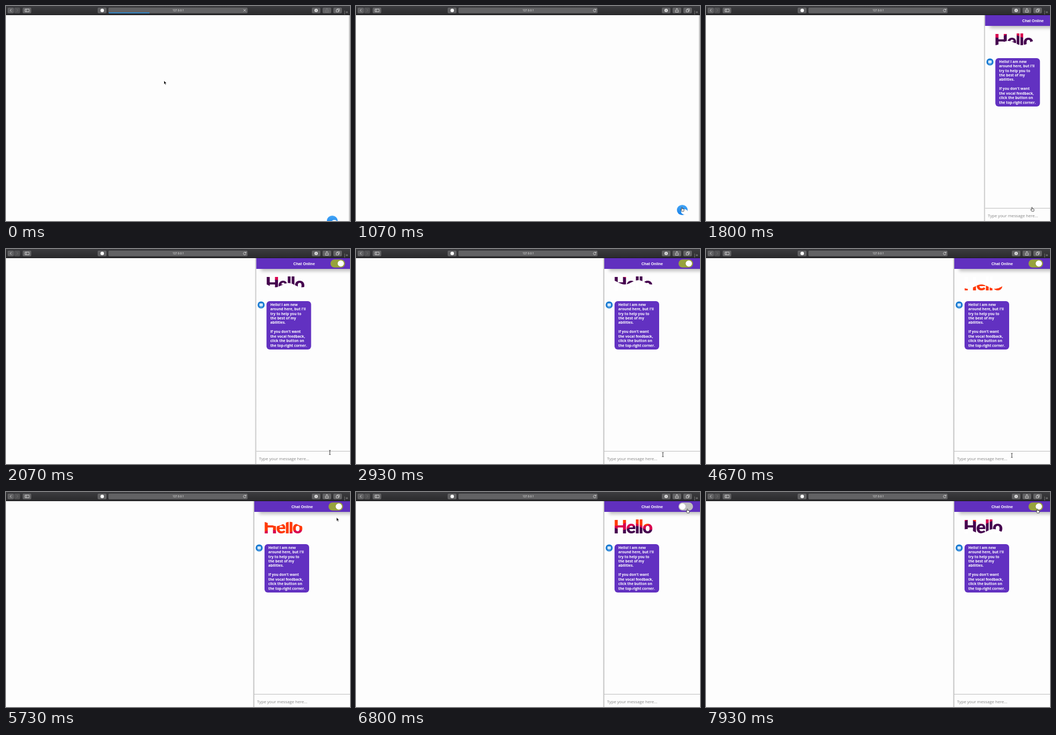
An HTML page for the animation above (8 s loop, 640 px wide and 400 px high).

```html
<!DOCTYPE html>
<html lang="en">
<head>
<meta charset="utf-8">
<title>Chat panel</title>
<style>
  html, body { margin: 0; width: 100%; height: 100%; overflow: hidden; background: #fdfdfd; }
  svg { display: block; width: 640px; height: 400px; }
  .url { font: 5.1px Roboto, sans-serif; fill: #eee; text-anchor: middle; }
  .title { font: bold 7.15px "Liberation Sans", sans-serif; fill: #fff; text-anchor: middle; }
  .msg { font: bold 6.7px "Open Sans", sans-serif; fill: #fff; }
  .hint { font: 7.7px "Open Sans", sans-serif; fill: #858585; }
  .hello { font: 900 33px Lato, sans-serif; letter-spacing: -1.5px; }
  .key { fill: #626264; }
  .line { fill: none; stroke: #e4e4e4; stroke-width: .8; }
</style>
</head>
<body>
<svg viewBox="0 0 640 400">
  <defs>
    <linearGradient id="bar" x2="0" y2="1">
      <stop stop-color="#3c3c3f"/><stop offset="1" stop-color="#2a2a2c"/>
    </linearGradient>
    <linearGradient id="edge">
      <stop stop-color="#999" stop-opacity="0"/><stop offset="1" stop-color="#999" stop-opacity=".75"/>
    </linearGradient>
    <linearGradient id="blue" x2="0" y2="1">
      <stop stop-color="#45a6f7"/><stop offset="1" stop-color="#1680e8"/>
    </linearGradient>
    <filter id="soft" x="-20%" y="-150%" width="140%" height="400%"><feGaussianBlur stdDeviation="3"/></filter>
    <clipPath id="word"><text class="hello" x="479" y="77">Hello</text></clipPath>
  </defs>

  <rect width="640" height="400" fill="#fdfdfd"/>

  <g id="launcher">
    <ellipse rx="10" ry="9.5" fill="url(#blue)"/>
    <ellipse cx="4" cy="3.5" rx="6" ry="5" fill="#fff"/>
  </g>

  <g id="panel">
    <rect x="459" y="17" width="3" height="383" fill="url(#edge)"/>
    <rect x="462" y="17" width="178" height="383" fill="#fdfdfd"/>
    <rect x="471" y="28" width="180" height="13" fill="#000" opacity=".25" filter="url(#soft)"/>
    <rect x="462" y="17" width="178" height="20" fill="#6130bf"/>
    <text class="title" x="551" y="29.7">Chat Online</text>
    <rect id="track" x="600" y="19.5" width="27" height="15" rx="7.5"/>
    <circle id="knob" cy="27" r="5.8" fill="#fff"/>
    <g id="waves" clip-path="url(#word)"><rect x="475" y="45" width="90" height="40" fill="#fff"/></g>
    <circle cx="471" cy="104" r="6.6" fill="#1b7cd3"/>
    <rect x="467.8" y="101.2" width="6.4" height="5.4" rx="1.4" fill="#d8ebfb"/>
    <path d="M468.5 108h5" stroke="#8fc2ee" stroke-width="1"/>
    <rect x="481" y="97" width="83" height="90" rx="6" fill="#6231c1"/>
    <g id="message"></g>
    <rect x="462" y="375.7" width="178" height="1.3" fill="#c9c9c9"/>
    <text class="hint" x="467" y="392.8">Type your message here...</text>
  </g>

  <g id="toolbar">
    <rect width="640" height="17" fill="url(#bar)"/>
    <rect y="16" width="640" height="1" fill="#19191b"/>
    <g class="key">
      <rect x="3" y="3" width="11.7" height="10.5" rx="2"/>
      <rect x="15.2" y="3" width="11" height="10.5" rx="2" opacity=".65"/>
      <rect x="31" y="3" width="16" height="10.5" rx="2"/>
      <rect x="170.5" y="3" width="16.5" height="10.5" rx="2"/>
      <rect x="190.5" y="3" width="259" height="10.5" rx="2"/>
      <rect x="569" y="3" width="16" height="10.5" rx="2"/>
      <rect x="589" y="3" width="16" height="10.5" rx="2"/>
      <rect x="609" y="3" width="16" height="10.5" rx="2"/>
    </g>
    <path class="line" d="M10 5.8l-2.2 2.4 2.2 2.4M35.5 5.8h7.5v4.9h-7.5zM38 5.8v4.9"/>
    <path class="line" d="M19.8 5.8l2.2 2.4-2.2 2.4" opacity=".25"/>
    <circle cx="179" cy="8.2" r="3.2" fill="#fff"/>
    <circle cx="577" cy="8.2" r="3" fill="#f2f2f2"/>
    <path d="M577 6.3v3.2m-1.3-1.2l1.3 1.4 1.3-1.4" fill="none" stroke="#555" stroke-width=".7"/>
    <path id="share" class="line" d="M595.5 7.5h-1.2v4h5.4v-4h-1.2M597 9.5v-5m-1.5 1.4l1.5-1.5 1.5 1.5"/>
    <path class="line" d="M614.3 7h4.2v4h-4.2zM616 7V5.3h4.2v4h-1.7"/>
    <path d="M630 8.5V16M632 11.5h4.4M634.2 9.3v4.4" stroke="#aaa" stroke-width=".6"/>
    <text class="url" x="320.5" y="10.2">127.0.0.1</text>
    <rect id="progress" x="191" y="12" height="1.4" fill="#2196f0"/>
    <path id="stop" class="line" d="M441.8 6l4.4 4.4m0-4.4l-4.4 4.4"/>
    <path id="reload" class="line" d="M446.3 7.2a2.5 2.5 0 1 0 .2 1.8M446.6 5v2.3h-2.2"/>
  </g>

  <g id="cursor">
    <path id="arrow" d="M0 0v6.6l1.5-1.4 1.1 2.5 1.1-.5-1.1-2.4h2.1z" fill="#000" stroke="#fff" stroke-width=".5"/>
    <path id="hand" d="M-1.2-3.2q.8-.9 1.4 0v2.4l2.8.7q.5.3.4 1.2l-.6 2.9h-3.7l-2-2.9q0-1 .9-.7l.8.7z" fill="#fff" stroke="#111" stroke-width=".7"/>
    <path id="beam" d="M-1.5-4q1.5 0 1.5.8 0-.8 1.5-.8M0-3.2v6.4M-1.5 4q1.5 0 1.5-.8 0 .8 1.5.8" fill="none" stroke="#222" stroke-width=".9"/>
  </g>
</svg>
<script>
const SVG = "http://www.w3.org/2000/svg";
const LOOP = 8;
const el = id => document.getElementById(id);
const set = (id, attrs) => { for (const k in attrs) el(id).setAttribute(k, attrs[k]); };
const show = (id, on) => set(id, { visibility: on ? "visible" : "hidden" });
const clamp = v => Math.min(1, Math.max(0, v));
const smooth = v => v * v * (3 - 2 * v);
const progress = (t, start, length) => clamp((t - start) / length);

function add(parent, tag, attrs, text = "") {
  const node = document.createElementNS(SVG, tag);
  for (const k in attrs) node.setAttribute(k, attrs[k]);
  node.textContent = text;
  el(parent).append(node);
  return node;
}

// CSS "ease" timing: cubic-bezier(.25, .1, .25, 1)
function ease(x) {
  let lo = 0, hi = 1, s = x;
  for (let i = 0; i < 20; i++) {
    s = (lo + hi) / 2;
    const at = .75 * s * (1 - s) + s ** 3;
    if (at < x) lo = s; else hi = s;
  }
  return .3 * s * (1 - s) ** 2 + 3 * s * s * (1 - s) + s ** 3;
}

// Interpolates between [time, ...values] stops.
function track(stops, t, curve = v => v) {
  const i = stops.findIndex(s => s[0] > t);
  if (i < 0) return stops[stops.length - 1].slice(1);
  if (i === 0) return stops[0].slice(1);
  const [a, b] = [stops[i - 1], stops[i]];
  const k = curve((t - a[0]) / (b[0] - a[0]));
  return a.slice(1).map((v, n) => v + (b[n + 1] - v) * k);
}

const lines = ["Hello! I am new", "around here, but I'll", "try to help you to", "the best of my", "abilities.", "",
  "If you don't want", "the vocal feedback,", "click the button on", "the top-right corner."];
lines.forEach((line, i) => add("message", "text", { class: "msg", x: 488, y: 105.6 + 8.45 * i }, line));

// Each colour rises through the word; the emptied word starts again at 4.1 s.
const waves = [
  { color: "#ff3b08", crest: 528, at: 5.73, levels: [[0, 40], [4.1, 40], [4.1, 84], [4.2, 81], [4.67, 70], [5.73, 59.5], [6.8, 46]] },
  { color: "#d9004f", crest: 510, at: 6.8, levels: [[0, 48], [1.8, 44], [4.1, 40], [4.1, 84], [5.2, 82], [5.73, 74], [6.8, 59], [7.93, 51]] },
  { color: "#46034f", crest: 520, at: 6.8, levels: [[0, 56], [1.8, 55], [2.93, 50], [3.3, 46], [4.1, 40], [4.1, 84], [6, 82], [6.8, 67], [7.93, 56]] },
  { color: "#fff", crest: 535, at: 7.93, levels: [[0, 75], [1.8, 69], [2.93, 62], [3.53, 57.5], [4.05, 46], [4.1, 46], [4.1, 84], [7.2, 82], [7.93, 73]] }
];
for (const wave of waves) wave.node = add("waves", "path", { fill: wave.color });

function wavePath(level, crest) {
  let d = "M475 90";
  for (let x = 475; x <= 565; x += 3)
    d += `L${x} ${(level - 4 * Math.cos((x - crest) * Math.PI / 25)).toFixed(2)}`;
  return d + "V90z";
}

const cursorPath = [[0, 294, 139], [.12, 294, 139], [.87, 607, 378], [1.95, 607, 378], [2.5, 571, 382.5],
  [2.9, 571, 382.5], [3.3, 569, 384], [5.08, 569, 384], [5.6, 614, 62], [5.73, 615, 47.5], [5.87, 617, 35]];

function draw(t) {
  const loading = t < .7;
  set("progress", { width: 76 + 182 * smooth(progress(t, .1, .5)) });
  show("progress", loading);
  show("stop", loading);
  show("reload", !loading);
  set("share", { opacity: loading ? .2 : 1 });

  const rise = 1 - (1 - progress(t, 0, .45)) ** 2;
  set("launcher", { transform: `translate(607 ${399.5 - 20 * rise})` });
  set("panel", { transform: `translate(${178 * (1 - ease(progress(t, 1.545, .645)))})` });

  const on = 1 - ease(progress(t, 6.3, .4)) + ease(progress(t, 7.48, .4));
  const mix = (off, lit) => Math.round(off + (lit - off) * on);
  set("track", { fill: `rgb(${mix(190, 151)},${mix(190, 163)},${mix(190, 60)})` });
  set("knob", { cx: 607.3 + 11.9 * on });

  for (const w of waves)
    w.node.setAttribute("d", wavePath(track(w.levels, t)[0], w.crest + 62 * (t - w.at)));

  const [x, y] = track(cursorPath, t, smooth);
  const hand = (t > .85 && t < 2) || t > 5.84;
  const beam = !hand && t >= 2 && y > 377;
  set("cursor", { transform: `translate(${x} ${y})` });
  show("hand", hand);
  show("beam", beam);
  show("arrow", !hand && !beam);
}

const start = performance.now();
function tick() {
  draw((performance.now() - start) / 1000 % LOOP);
  requestAnimationFrame(tick);
}
tick();
</script>
</body>
</html>
```
